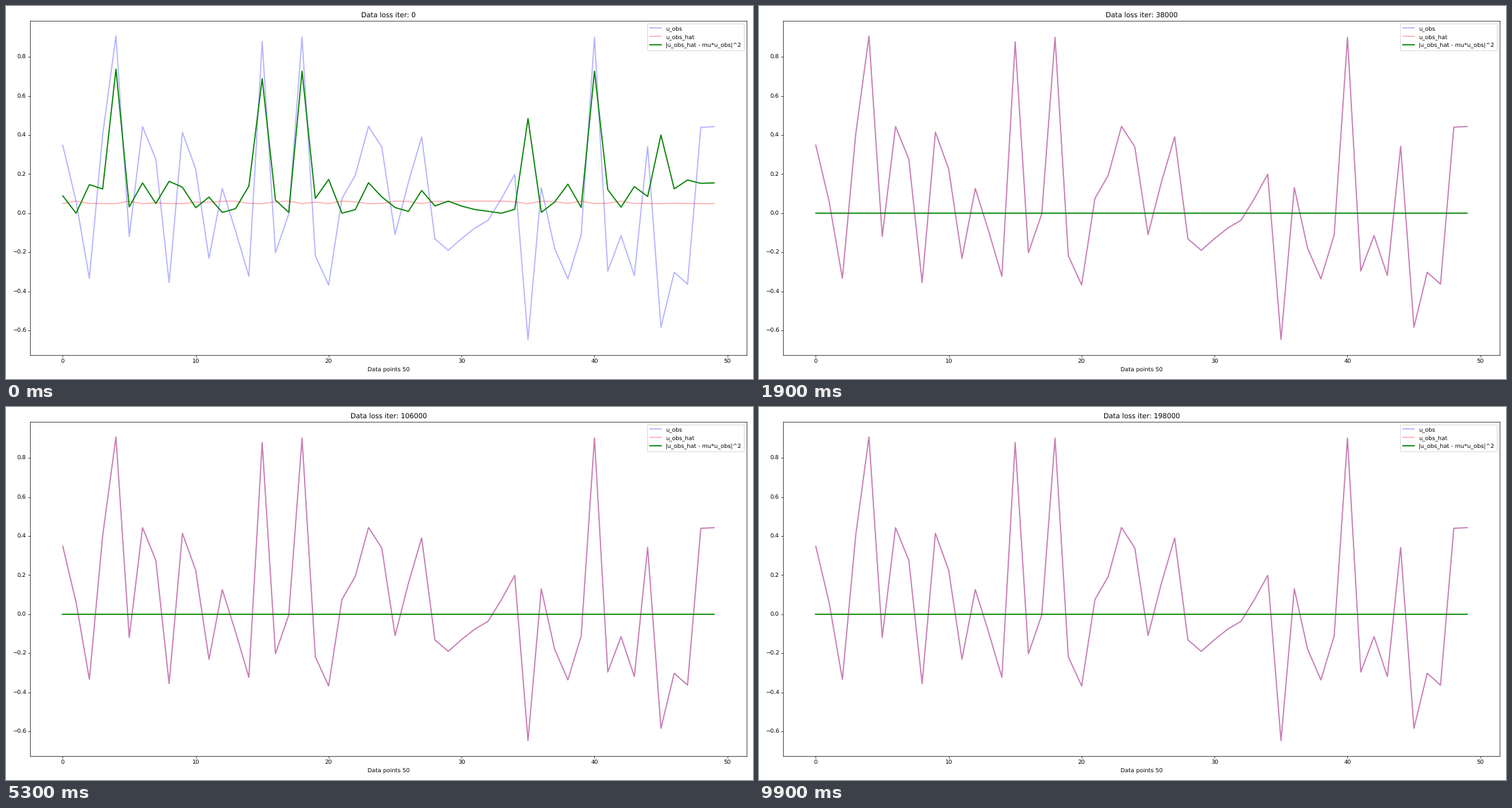
These frames come from a looping animation (1058 px wide and 529 px high, 10 s). A matplotlib script:

```python
import numpy as np
import matplotlib.pyplot as plt
from matplotlib.animation import FuncAnimation

plt.rcParams["font.family"] = "DejaVu Sans"
plt.rcParams["text.hinting"] = "none"

W, H = 1058, 529
FRAMES, STEP = 100, 2000

# Corner points of the observed signal, in thousandths
u_obs = np.array([
    348, 61, -333, 401, 908, -119, 443, 276, -355, 414,
    225, -231, 126, -91, -323, 879, -202, -4, 902, -218,
    -367, 75, 193, 444, 339, -109, 158, 390, -132, -190,
    -130, -76, -36, 75, 199, -647, 130, -179, -336, -111,
    902, -296, -115, -319, 342, -584, -302, -363, 440, 443]) / 1000
x = np.arange(len(u_obs))

# The untrained network is almost flat, a little higher where the signal is small
u_start = 0.049 + 0.013 * np.exp(-(u_obs / 0.26)**4)
misfit = 0.0249 * u_obs - 0.00365 * u_obs**2 - 0.05 * u_obs**3


def predict(k):
    """Network output after k * STEP iterations."""
    start = np.exp(-k / 1.2)
    late = np.exp(-(k - 11) / 5) * (1 - start)
    return u_obs + (u_start - u_obs) * start + misfit * late


fig = plt.figure(figsize=(18, 9), dpi=58.78)
left, right, top, bottom = 34.3, 1049.0, 20.8, 494.7
ax = fig.add_axes([left / W, 1 - bottom / H,
                   (right - left) / W, (bottom - top) / H])
ax.plot(x, u_obs, "b", lw=2, alpha=0.3, label="u_obs")
hat_line, = ax.plot(x, u_start, "r", lw=2, alpha=0.3, label="u_obs_hat")
loss_line, = ax.plot(x, (u_start - u_obs)**2, "g", lw=2,
                     label="|u_obs_hat - mu*u_obs|^2")
ax.set_xlabel(f"Data points {len(x)}")
ax.legend(loc="upper right")
title = ax.set_title("")


def update(k):
    hat = predict(k)
    hat_line.set_ydata(hat)
    loss_line.set_ydata((hat - u_obs)**2)
    ax.relim()
    ax.autoscale_view()
    title.set_text(f"Data loss iter: {k * STEP}")
    return hat_line, loss_line, title


anim = FuncAnimation(fig, update, frames=FRAMES, interval=100,
                     init_func=lambda: update(0), repeat=True,
                     repeat_delay=0, blit=False)
plt.show()
```
